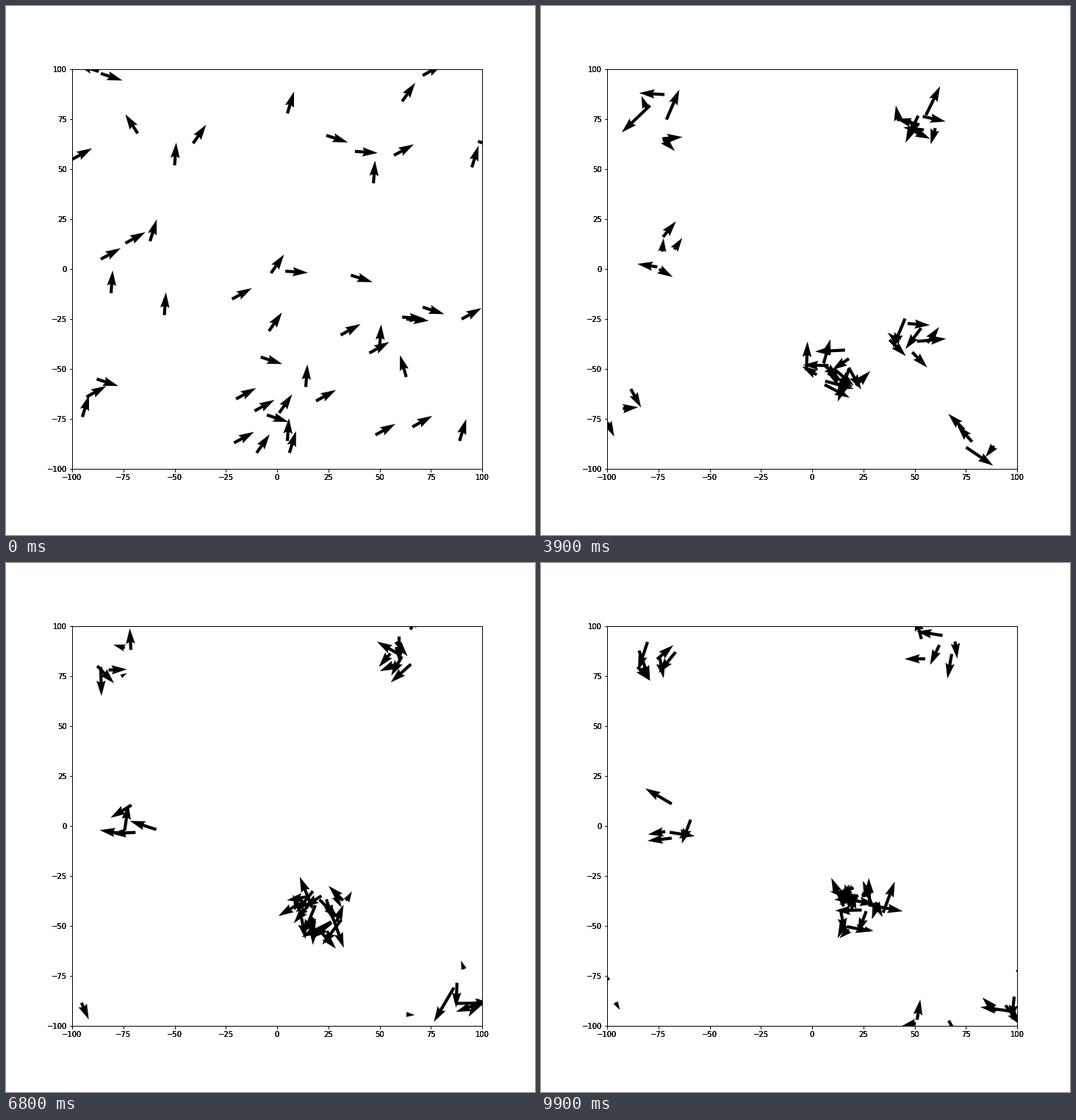
These frames come from a looping animation (720x720 px, 10000 ms). A matplotlib script:

```python
import matplotlib.pyplot as plt
import numpy as np
from matplotlib.animation import FuncAnimation

FRAMES = 100
HALF = 100  # the world wraps at -HALF and +HALF
SPEED = 1.3

# Starting birds by heading in degrees
STREAMS = {
    -18: [(-86, 98), (24, 67), (98, 64), (36, -3), (71, -19), (-5, -73),
          (-88, -55), (-8, -44)],
    -4: [(38, 59), (4, -1), (61, -24), (63, -25)],
    29: [(-100, 55), (57, 57), (71, 97), (-86, 5), (-74, 13), (-22, -15),
         (31, -33), (90, -25), (45, -42), (19, -66), (-20, -65), (-11, -71),
         (-21, -87), (48, -83), (66, -79), (-93, -64)],
    55: [(-41, 63), (61, 84), (-3, -2), (-4, -31), (1, -72), (-10, -92)],
    73: [(5, 78), (95, 51), (-62, 14), (6, -92), (89, -86), (-95, -74)],
    86: [(47, 43), (-81, -12), (50, -39), (5, -86), (-50, 52), (-55, -23),
         (14, -59)],
    106: [(63, -54)],
    123: [(-68, 68)],
    162: [(-87, 99)],
}

# Flock centres: from x, y to x, y
FLOCKS = np.array([
    (-70, 73, -80, 86),
    (52, 72, 60, 93),
    (-67, 6, -70, 2),
    (62, -25, 22, -43),
    (5, -52, 22, -43),
    (76, -78, 94, -85),
    (-92, -58, -106, -85),
])


def fly():
    """Positions and velocities of all birds for the whole loop."""
    rng = np.random.default_rng(12)
    start = np.array([p for group in STREAMS.values() for p in group], float)
    heading = np.radians([a for a, group in STREAMS.items() for _ in group])

    # Every bird joins the nearest flock
    gaps = np.linalg.norm(start[:, None] - FLOCKS[:, :2], axis=2)
    flock = FLOCKS[gaps.argmin(axis=1)]
    home, goal = flock[:, :2], flock[:, 2:]

    offset = start - home
    vel = SPEED * np.column_stack([np.cos(heading), np.sin(heading)])
    places, speeds = [], []
    for i in range(FRAMES):
        s = np.clip((i - 20) / 48, 0, 1)
        centre = home + (goal - home) * s * s * (3 - 2 * s)
        places.append((centre + offset + HALF) % (2 * HALF) - HALF)
        speeds.append(vel)

        calm = min(i / 35, 1)
        pull = 0.009 + 0.021 * calm
        cruise = 0.1 + 0.25 * calm
        size = np.linalg.norm(vel, axis=1, keepdims=True) + 1e-6
        vel = vel + cruise * (SPEED - size) * vel / size - pull * offset
        vel = vel + rng.normal(0, 0.27, vel.shape)
        offset = offset + vel
    return np.array(places), np.array(speeds)


places, speeds = fly()
# Arrow lengths are relative to the mean speed of the moment
speeds /= np.linalg.norm(speeds, axis=2).mean(axis=1)[:, None, None]

fig = plt.figure(figsize=(10, 10), dpi=72, facecolor="white")
ticks = np.arange(-HALF, HALF + 1, 25)
# Stacked axes give the heavy tick labels
for _ in range(3):
    ax = fig.add_axes([0.125, 0.125, 0.775, 0.755], facecolor="none")
    ax.set(xlim=(-HALF, HALF), ylim=(-HALF, HALF), xticks=ticks, yticks=ticks)
    ax.tick_params(labelsize=10)

arrows = ax.quiver(*places[0].T, *speeds[0].T, scale=18, width=0.0075)


def update(i):
    arrows.set_offsets(places[i])
    arrows.set_UVC(*speeds[i].T)
    return [arrows]


anim = FuncAnimation(fig, update, frames=FRAMES, interval=100, repeat=True)
plt.show()
```
